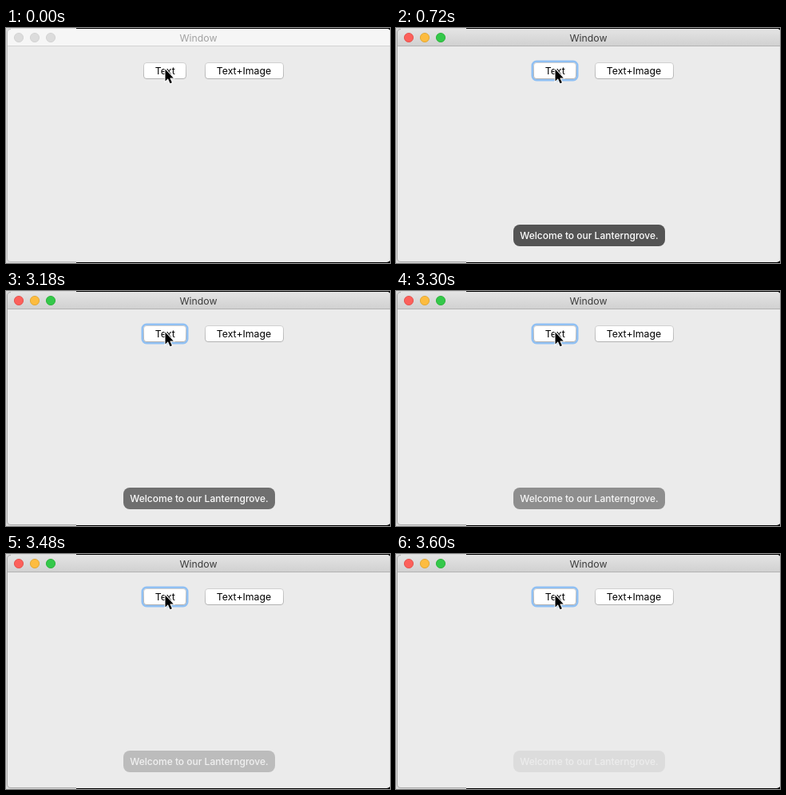
An HTML page that plays this animation: 481x294 px, repeating every 5460 ms.

```html
<!DOCTYPE html>
<html lang="en">
<head>
<meta charset="utf-8">
<title>Toast demo</title>
<style>
  html, body { margin: 0; width: 100%; height: 100%; overflow: hidden; }
  svg { display: block; width: 481px; height: 294px; }
  text { font: 12.3px Inter, Roboto, sans-serif; text-anchor: middle; }
  #title { fill: #a2a2a2; }
  #bar { fill: #f6f6f6; }
  #rule { fill: #d3d3d3; }
  #lights circle { fill: #dcdcdc; stroke: #cfcfcf; stroke-width: .8; }
  #edge { fill: none; stroke: #bdbdbd; }
  #ring { fill: none; stroke: #90c0f3; stroke-width: 3; visibility: hidden; }
  .button { fill: #fff; stroke: url(#rim); }

  .active #title { fill: #3c3c3c; }
  .active #bar { fill: url(#barFill); }
  .active #rule { fill: #b3b3b3; }
  .active #edge { stroke: #a9a9a9; }
  .active #ring { visibility: visible; }
  .active #lights .close { fill: #fc605b; stroke: #e2463f; }
  .active #lights .hide { fill: #fdbc40; stroke: #dfa023; }
  .active #lights .zoom { fill: #34c84a; stroke: #1dad2b; }
  .pressed #first { fill: url(#blue); stroke: #1d6be0; }
  .pressed #label { fill: #dcebff; }
  #toast text { font-size: 12px; font-weight: 500; fill: #fff; }
</style>
</head>
<body>
<svg id="stage" viewBox="0 0 481 294">
  <defs>
    <linearGradient id="barFill" x2="0" y2="1">
      <stop stop-color="#e4e4e4"/><stop offset="1" stop-color="#d1d1d1"/>
    </linearGradient>
    <linearGradient id="blue" x2="0" y2="1">
      <stop stop-color="#4d9df8"/><stop offset="1" stop-color="#0c62e9"/>
    </linearGradient>
    <linearGradient id="rim" x2="0" y2="1">
      <stop stop-color="#d0d0d0"/><stop offset="1" stop-color="#b2b2b2"/>
    </linearGradient>
    <clipPath id="frame"><rect x="1" y="1" width="481" height="292" rx="5"/></clipPath>
  </defs>

  <rect width="481" height="294"/>
  <rect width="88" height="294" fill="#d9d9d9"/>
  <g clip-path="url(#frame)">
    <rect width="481" height="294" fill="#ebebeb"/>
    <rect id="bar" y="1" width="481" height="21"/>
    <rect id="rule" y="22" width="481" height="1"/>
  </g>
  <path id="edge" d="M1.5 288V6Q1.5 1.5 6 1.5M1.5 288Q1.5 292.5 6 292.5H88"/>
  <g id="lights">
    <circle class="close" cx="16" cy="12" r="5.6"/>
    <circle class="hide" cx="36" cy="12" r="5.6"/>
    <circle class="zoom" cx="56" cy="12" r="5.6"/>
  </g>
  <text id="title" x="241" y="17">Window</text>

  <rect id="ring" x="171" y="42" width="56" height="23" rx="5"/>
  <rect id="first" class="button" x="172.5" y="43.5" width="53" height="20" rx="3.5"/>
  <text id="label" x="199.3" y="58">Text</text>
  <rect class="button" x="249.5" y="43.5" width="98" height="20" rx="3.5"/>
  <text x="298" y="58">Text+Image</text>

  <g id="toast">
    <rect x="147" y="246" width="190" height="27" rx="8" fill="#545454"/>
    <text x="242" y="264">Welcome to our Lanterngrove.</text>
  </g>
  <path d="M199.5 51.5v15l3.4-3.2 2.6 6 2.4-1-2.6-5.8h4.4z"
        stroke="#fff" stroke-width="2" paint-order="stroke"/>
</svg>
<script>
  const LOOP = 5460, PRESS = 550, SHOW = 720, FADE = 3120, STEP = 60;
  const stage = document.getElementById('stage');
  const toast = document.getElementById('toast');

  function toastOpacity(t) {
    if (t < SHOW) return 0;
    if (t < FADE) return 1;
    const step = Math.min(8, Math.floor((t - FADE) / STEP));
    return 0.92 - 0.103 * step;
  }

  function draw(now) {
    const t = now % LOOP;
    stage.classList.toggle('active', t >= PRESS);
    stage.classList.toggle('pressed', t >= PRESS && t < SHOW);
    toast.setAttribute('opacity', toastOpacity(t));
  }

  const start = performance.now();
  function tick() {
    draw(performance.now() - start);
    requestAnimationFrame(tick);
  }
  tick();
</script>
</body>
</html>
```
